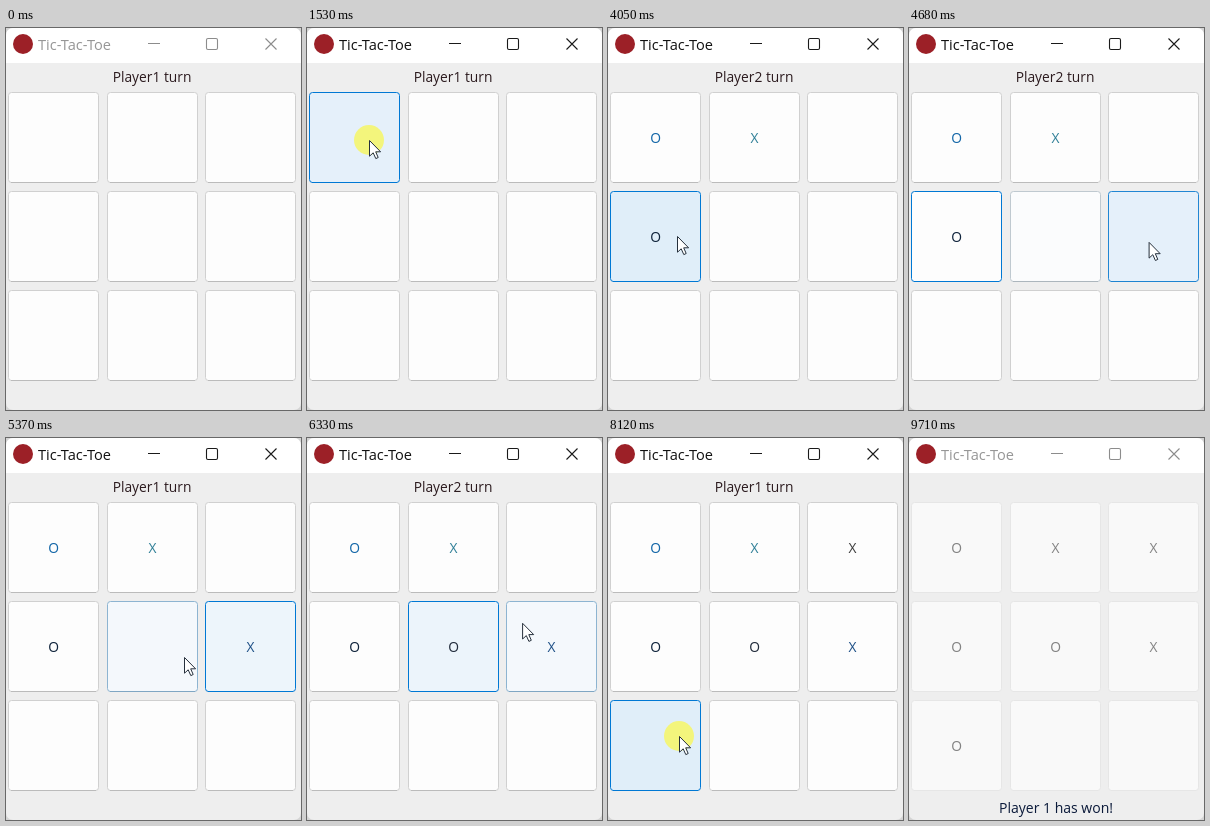
Animation, 295 px wide and 382 px high, one loop 9780 ms. Source, as an HTML page:

```html
<!DOCTYPE html>
<html lang="en">
<head>
<meta charset="utf-8">
<title>Tic-Tac-Toe</title>
<style>
  html, body { margin: 0; width: 100%; height: 100%; overflow: hidden; background: #d4d4d4; }
  svg { display: block; width: 295px; height: 382px; }
  text { font-family: "Open Sans", "Noto Sans", sans-serif; font-size: 13.8px; }
  .mid { text-anchor: middle; }
</style>
</head>
<body>
<svg id="stage" viewBox="0 0 295 382" xmlns="http://www.w3.org/2000/svg">
  <rect width="295" height="382" rx="7" fill="#eeeeee"/>
  <path d="M0 35V7a7 7 0 0 1 7-7H288a7 7 0 0 1 7 7V35Z" fill="#fff"/>
  <circle cx="17" cy="16" r="10" fill="#9c2027"/>
  <text id="title" x="32" y="21.5" style="font-size:14.6px">Tic-Tac-Toe</text>
  <g id="controls" fill="none" stroke-width="1.1">
    <path d="M142 15.5H154M259.5 10.5L270.5 21.5M270.5 10.5L259.5 21.5"/>
    <rect x="200.5" y="10.5" width="11" height="11" rx="1.5"/>
  </g>
  <text id="turn" class="mid" x="146" y="54" fill="#2b1a1e"></text>
  <g id="board"></g>
  <text id="result" class="mid" x="147" y="375" fill="#0b1a3a" style="font-size:14px"></text>
  <circle id="halo" r="15" fill="#f3f57c"/>
  <path id="pointer" d="M.5 .5V16.2L4.2 12.8L6.8 18.6L9.2 17.5L6.7 11.8H11.6Z"
        fill="#fff" stroke="#26303c" stroke-linejoin="round"/>
</svg>
<script>
const LOOP = 9780, WIN = 8190, BLUR = 9710, FADE = 250, TICK = 10, SLACK = 20;
const PRESS = 140; // time from press to mark

// Bursts of screen updates: start, end, steps
const bursts = [
  [980, 1600, 10], [1930, 2690, 12], [3020, 3720, 11], [4050, 4890, 13], [5090, 5860, 12],
  [6130, 6820, 11], [7020, 7980, 15], [8050, 8260, 4], [8850, 9180, 6], [9710, 9710, 1]
];

// Pointer path: time, x, y
const path = [
  [910, 205, 400], [1460, 62, 112], [1860, 62, 112], [2340, 98, 111], [2550, 142, 112],
  [2950, 142, 112], [3580, 66, 207], [3980, 66, 207], [4050, 69, 208], [4750, 243, 214],
  [5020, 243, 214], [5370, 178, 219], [5720, 146, 222], [6060, 146, 222], [6330, 214, 186],
  [6680, 246, 116], [6960, 246, 116], [7230, 230, 162], [7440, 171, 227], [7910, 71, 298],
  [8780, 71, 298], [9180, 200, 394]
];

// Moves: time of mark, cell, ink
const moves = [
  [1600, 0, "#1467a8"], [2690, 1, "#2f7f97"], [3720, 3, "#10243c"], [4890, 5, "#1d4f86"],
  [5860, 4, "#222c3c"], [6820, 2, "#3c3c3c"], [WIN, 6, "#838383"]
];

const $ = id => document.getElementById(id);
const clamp = v => Math.max(0, Math.min(1, v));
const rgb = hex => [1, 3, 5].map(i => parseInt(hex.slice(i, i + 2), 16));
const mix = (a, b, k) => {
  const p = rgb(a), q = rgb(b);
  return "#" + p.map((v, i) => Math.round(v + (q[i] - v) * k).toString(16).padStart(2, "0")).join("");
};

function make(name, attrs) {
  const el = document.createElementNS("http://www.w3.org/2000/svg", name);
  for (const key in attrs) el.setAttribute(key, attrs[key]);
  $("board").append(el);
  return el;
}

const cells = Array.from({ length: 9 }, (_, i) => {
  const x = [2, 101, 199][i % 3], y = [64, 163, 262][Math.floor(i / 3)];
  return {
    x, y,
    box: make("rect", { x: x + .5, y: y + .5, width: 90, height: 90, rx: 3 }),
    edge: make("path", { d: `M${x + 3} ${y + 90.5}h85` }),
    mark: make("text", { class: "mid", x: x + 45.5, y: y + 51 })
  };
});

function slope(i, axis) {
  const a = path[i - 1], p = path[i], b = path[i + 1];
  if (!a || !b) return 0;
  const still = q => q[1] === p[1] && q[2] === p[2];
  return still(a) || still(b) ? 0 : (b[axis] - a[axis]) / (b[0] - a[0]);
}

function pointerAt(t) {
  if (t < path[0][0] || t >= path[path.length - 1][0]) return [-50, -50];
  const i = path.findIndex((p, k) => t < path[k + 1][0]);
  const a = path[i], b = path[i + 1], d = b[0] - a[0], u = (t - a[0]) / d;
  const h = u * u * (3 - 2 * u);
  return [1, 2].map(n => a[n] + (b[n] - a[n]) * h
    + d * u * (1 - u) * ((1 - u) * slope(i, n) - u * slope(i + 1, n)));
}

// Hover strength of every cell over the loop
const hover = [];
for (let t = 0, level = Array(9).fill(0); t <= LOOP; t += TICK) {
  const [px, py] = pointerAt(t);
  level = level.map((v, i) => {
    const { x, y } = cells[i];
    const over = px >= x && px < x + 91 && py >= y && py < y + 91;
    return clamp(v + (over ? 1 : -1) * TICK / FADE);
  });
  hover.push(level);
}

function snap(t) {
  let shown = 0;
  for (const [start, end, n] of bursts) {
    if (t < start) break;
    const dt = (end - start) / (n - 1) || 1;
    shown = Math.min(end, start + Math.floor((t - start) / dt + .15) * dt);
  }
  return shown;
}

function draw(time) {
  const t = snap(time), now = t + SLACK;
  const done = moves.filter(m => now >= m[0]);
  const pressed = moves.filter(m => now >= m[0] - PRESS);
  const focus = pressed.length ? pressed[pressed.length - 1][1] : -1;
  const won = now >= WIN;
  const off = clamp((t - WIN + 70) / 140);
  const active = pressed.length > 0 && now < BLUR;
  const levels = hover[Math.round(t / TICK)];

  $("title").setAttribute("fill", active ? "#111111" : "#969696");
  $("controls").setAttribute("stroke", active ? "#1a1a1a" : "#8c8c8c");
  $("turn").textContent = won ? "" : `Player${done.length % 2 + 1} turn`;
  $("result").textContent = won ? "Player 1 has won!" : "";

  cells.forEach((c, i) => {
    const k = levels[i], n = done.findIndex(m => m[1] === i);
    const line = base => mix(i === focus ? "#0078d4" : mix(base, "#0078d4", k), "#e6e6e6", off);
    c.box.setAttribute("fill", mix(mix("#fdfdfd", "#e0eef9", k), "#f9f9f9", off));
    c.box.setAttribute("stroke", line("#d0d0d0"));
    c.edge.setAttribute("stroke", line("#bbbbbb"));
    c.mark.textContent = n < 0 ? "" : "OX"[n % 2];
    if (n >= 0) c.mark.setAttribute("fill", mix(done[n][2], "#838383", off));
  });

  const [x, y] = pointerAt(t), at = `translate(${x.toFixed(1)} ${y.toFixed(1)})`;
  $("pointer").setAttribute("transform", at);
  $("halo").setAttribute("transform", at);
  $("halo").style.display = pressed.length > done.length ? "" : "none";
}

const begin = performance.now();
function frame() {
  draw((performance.now() - begin) % LOOP);
  requestAnimationFrame(frame);
}
frame();
</script>
</body>
</html>
```
